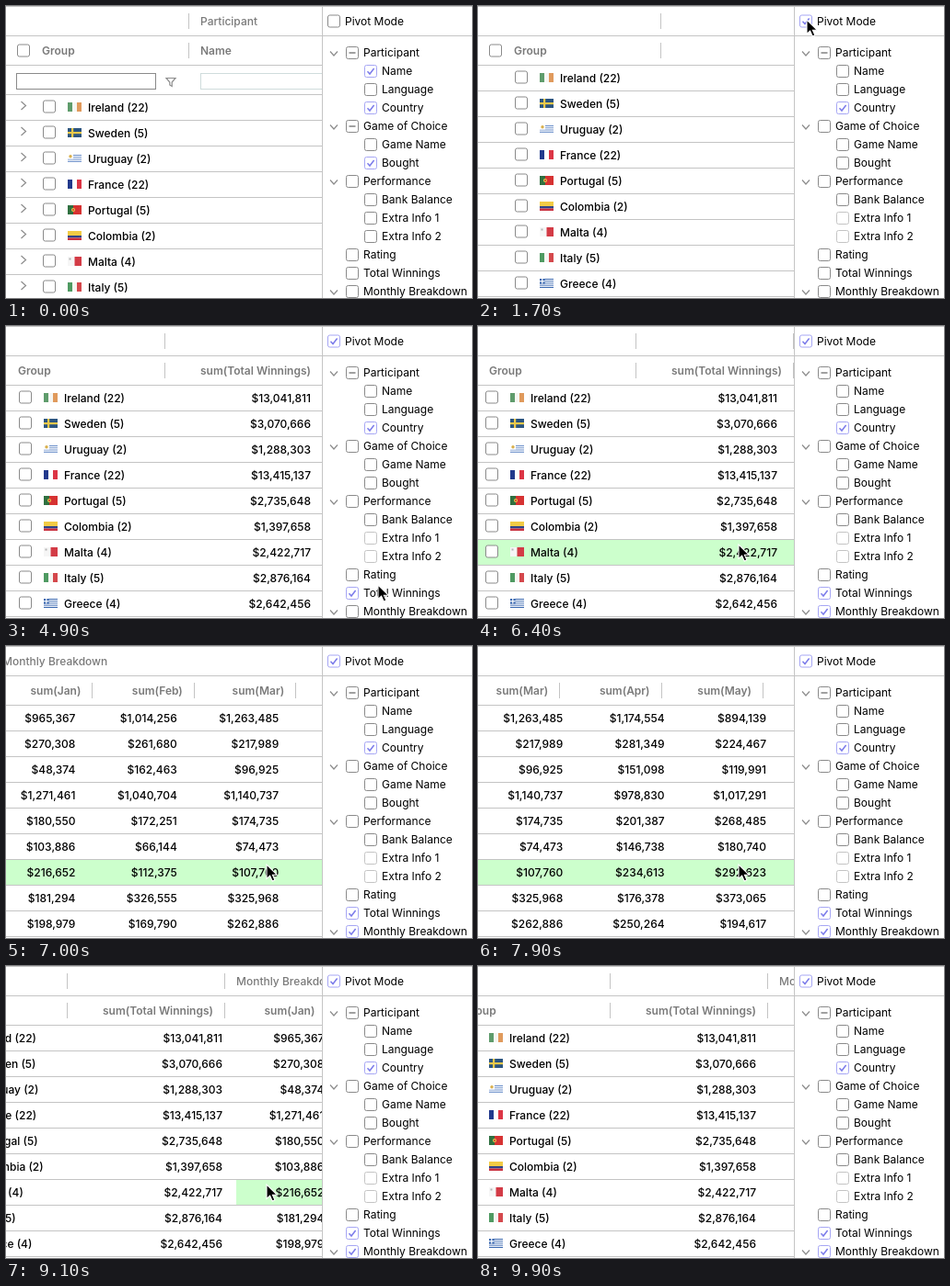
An HTML page for the animation above (10 s loop, 506 by 318 pixels).

```html
<!DOCTYPE html>
<html lang="en">
<head>
<meta charset="utf-8">
<title>Pivot grid</title>
<style>
  html, body { margin: 0; width: 100%; height: 100%; overflow: hidden; background: #fff; }
  svg { display: block; }
  text { font: 400 12px Inter, "Noto Sans", sans-serif; fill: #000; }
  .cell { font-weight: 500; }
  .head { font-weight: 600; fill: #7a7a7a; }
  .band { font-weight: 500; fill: #7a7a7a; }
  .end { text-anchor: end; }
  .rule { stroke: #c4c4c4; }
  .icon { fill: none; stroke: #8c8c8c; stroke-width: 1.2; }
  .box { fill: #fff; stroke: #8a8a8a; }
  .box.on { stroke: #a6a6f4; }
  .tick { fill: none; stroke: #7b7bea; stroke-width: 1.5; }
  .dash { stroke: #777; stroke-width: 1.4; }
</style>
</head>
<body>
<svg id="stage" width="506" height="318" viewBox="0 0 506 318">
  <clipPath id="view"><rect width="343" height="318"/></clipPath>
</svg>
<script>
const LOOP = 10000, STEP = 100, LAG = 35;
const CLICK = { pivot: 1500, total: 3300, months: 5400 };
const ROW = 28, TOP = 64, FILTER = 32;
const GROUP_END = 198, SUM_END = 369, MONTH_W = 110.4;

// [time, offset, slope]
const SCROLL = [
  [3550, 0, 0], [4000, 26, 0], [6350, 26, 0], [7000, 392, .085],
  [7550, 690, 0], [7900, 596, -.46], [8600, 260, -.19], [9500, 55, 0]
];

// [time, x, y]
const POINTER = [
  [500, 520, 90], [1400, 357, 15], [2000, 357, 15], [3200, 376, 288], [3400, 376, 288],
  [3650, 310, 262], [4150, 310, 262], [4900, 404, 282], [5250, 377, 308], [5500, 377, 308],
  [6250, 283, 238], [9250, 283, 238], [9650, 296, 330]
];

const MONTHS = ['Jan', 'Feb', 'Mar', 'Apr', 'May', 'Jun', 'Jul', 'Aug'];
const DATA = [
  ['Ireland (22)', 13041811, 965367, 1014256, 1263485, 1174554, 894139],
  ['Sweden (5)', 3070666, 270308, 261680, 217989, 281349, 224467],
  ['Uruguay (2)', 1288303, 48374, 162463, 96925, 151098, 119991],
  ['France (22)', 13415137, 1271461, 1040704, 1140737, 978830, 1017291],
  ['Portugal (5)', 2735648, 180550, 172251, 174735, 201387, 268485],
  ['Colombia (2)', 1397658, 103886, 66144, 74473, 146738, 180740],
  ['Malta (4)', 2422717, 216652, 112375, 107760, 234613, 292623],
  ['Italy (5)', 2876164, 181294, 326555, 325968, 176378, 373065],
  ['Greece (4)', 2642456, 198979, 169790, 262886, 250264, 194617]
];

// [label, depth, expandable, mark before, mark after, switch time]; marks: 0 none, 1 tick, 2 dash
const TREE = [
  ['Participant', 0, 1, 2, 2], ['Name', 1, 0, 1, 0], ['Language', 1, 0, 0, 0], ['Country', 1, 0, 1, 1],
  ['Game of Choice', 0, 1, 2, 0], ['Game Name', 1, 0, 0, 0], ['Bought', 1, 0, 1, 0],
  ['Performance', 0, 1, 0, 0], ['Bank Balance', 1, 0, 0, 0], ['Extra Info 1', 1, 0, 0, 0],
  ['Extra Info 2', 1, 0, 0, 0], ['Rating', 0, 0, 0, 0],
  ['Total Winnings', 0, 0, 0, 1, CLICK.total], ['Monthly Breakdown', 0, 1, 0, 1, CLICK.months]
];

const stage = document.getElementById('stage');

function add(parent, tag, attrs = {}, text) {
  const el = document.createElementNS('http://www.w3.org/2000/svg', tag);
  for (const key in attrs) el.setAttribute(key, attrs[key]);
  if (text) el.textContent = text;
  parent.append(el);
  return el;
}
const group = parent => add(parent, 'g');
const label = (parent, x, y, text, cls = '') => add(parent, 'text', { x, y, class: cls }, text);
const path = (parent, d, cls) => add(parent, 'path', { d, class: cls });
const rect = (parent, x, y, width, height, fill) => add(parent, 'rect', { x, y, width, height, fill });
const show = (el, on) => { el.style.display = on ? '' : 'none'; };
const move = (el, x, y) => el.setAttribute('transform', `translate(${x} ${y})`);
const money = n => '$' + n.toLocaleString('en-US');
const monthEnd = i => SUM_END + MONTH_W * (i + 1);

function checkbox(parent, cx, cy) {
  const g = group(parent);
  const box = add(g, 'rect', { x: cx - 6.5, y: cy - 6.5, width: 13, height: 13, rx: 2, class: 'box' });
  const tick = path(g, `M${cx - 3.5} ${cy + .3}l2.5 2.7l4.6 -6`, 'tick');
  const dash = path(g, `M${cx - 3.5} ${cy}h7`, 'dash');
  const set = mark => {
    box.classList.toggle('on', mark === 1);
    show(tick, mark === 1);
    show(dash, mark === 2);
  };
  set(0);
  return { g, set };
}

function bands(parent, colors, sizes, vertical) {
  const sum = sizes.reduce((a, b) => a + b);
  let at = 0;
  colors.forEach((color, i) => {
    const size = sizes[i] / sum * (vertical ? 15 : 10);
    if (vertical) rect(parent, at, 0, size, 10, color);
    else rect(parent, 0, at, 15, size, color);
    at += size;
  });
}
const thirds = (...colors) => g => bands(g, colors, [1, 1, 1], true);
const stripes = (a, b) => g =>
  bands(g, Array.from({ length: 9 }, (_, i) => i % 2 ? b : a), Array(9).fill(1));
const dot = (g, cx, cy, r, fill) => add(g, 'circle', { cx, cy, r, fill });

const FLAGS = [
  thirds('#5f9c6c', '#f6f6f2', '#e09a5c'),
  g => {
    rect(g, 0, 0, 15, 10, '#2c5580');
    rect(g, 4, 0, 2.2, 10, '#ecc94a');
    rect(g, 0, 4, 15, 2.2, '#ecc94a');
  },
  g => {
    stripes('#fff', '#5b83c4')(g);
    rect(g, 0, 0, 6, 5.5, '#fff');
    dot(g, 3, 2.8, 1.7, '#d9b04c');
  },
  thirds('#22398c', '#fff', '#dc3545'),
  g => {
    bands(g, ['#2f7040', '#d63232'], [2, 3], true);
    dot(g, 6, 5, 2, '#e8cf4a');
    dot(g, 6, 5, 1, '#d63232');
  },
  g => bands(g, ['#f2cb45', '#2f4488', '#c9313f'], [2, 1, 1]),
  g => {
    bands(g, ['#f6f6f6', '#d33b46'], [1, 1], true);
    rect(g, 1.5, 1.5, 2, 2, '#b4b4b4');
  },
  thirds('#4f9a62', '#f6f6f2', '#d4484c'),
  g => {
    stripes('#3a68b0', '#fff')(g);
    rect(g, 0, 0, 5.6, 5.6, '#3a68b0');
    rect(g, 2.2, 0, 1.2, 5.6, '#fff');
    rect(g, 0, 2.2, 5.6, 1.2, '#fff');
  }
];

function randomizer(seed) {
  return () => (seed = (seed * 16807) % 2147483647) / 2147483647;
}
const random = randomizer(77);

// Grid
rect(stage, 0, 0, 506, 318, '#fff');
const grid = add(stage, 'g', { 'clip-path': 'url(#view)' });
const hover = rect(grid, 0, 0, 343, ROW - 1, '#ccffcc');
const lines = group(grid);
DATA.forEach((_, i) => path(lines, `M0 ${TOP + ROW * (i + 1) + .5}H343`, 'rule'));

const body = group(grid), expanders = group(body), sums = group(body), cells = group(body);
DATA.forEach(([name, total, ...months], i) => {
  const y = TOP + ROW * i + 14;
  path(expanders, `M16.5 ${y - 6}l5 4.5l-5 4.5`, 'icon');
  checkbox(body, 47, y - .5);
  const flag = group(body);
  move(flag, 67, y - 5);
  FLAGS[i](flag);
  label(body, 89, y + 4.5, name, 'cell');
  label(sums, SUM_END - 12, y + 4.5, money(total), 'cell end');
  MONTHS.forEach((_, m) => {
    const value = months[m] || Math.round(total * (.05 + .06 * random()));
    label(cells, monthEnd(m) - 12, y + 4.5, money(value), 'cell end');
  });
});

const head = group(grid);
const divider = (parent, x, y) => path(parent, `M${x + .5} ${y}v17`, 'rule');
checkbox(head, 19, 48.5);
label(head, 39, 53, 'Group', 'head');
divider(head, GROUP_END, 8);
divider(head, GROUP_END, 40);

const plain = group(head);
label(plain, 211, 21, 'Participant', 'band');
label(plain, 211, 53, 'Name', 'head');
add(plain, 'rect', { x: 11.5, y: 73.5, width: 151, height: 17, class: 'box' });
add(plain, 'rect', { x: 211.5, y: 73.5, width: 151, height: 17, fill: '#fff', stroke: '#cfdcdc' });
path(plain, 'M174 78.5h10l-3.8 4.5v4.5l-2.4 -1.5v-3z', 'icon');

const sumHead = group(head);
label(sumHead, SUM_END - 12, 53, 'sum(Total Winnings)', 'head end');
divider(sumHead, SUM_END, 8);
divider(sumHead, SUM_END, 40);

const monthHead = group(head);
label(monthHead, SUM_END + 13, 21, 'Monthly Breakdown', 'band');
MONTHS.forEach((name, m) => {
  label(monthHead, monthEnd(m) - 12, 53, `sum(${name})`, 'head end');
  divider(monthHead, Math.round(monthEnd(m)), 40);
});

const filterLine = path(grid, `M0 ${TOP + FILTER + .5}H343`, 'rule');
path(grid, `M0 ${TOP + .5}H343`, 'rule');

// Side panel
path(stage, 'M0 .5H506M0 32.5H506M343.5 0V318', 'rule');
const pivotBox = checkbox(stage, 356, 16.5);
label(stage, 368, 21, 'Pivot Mode');
const boxes = TREE.map(([name, depth, open, before, after, at = CLICK.pivot], i) => {
  const y = 51 + 20 * i, x = 376 + 20 * depth;
  if (open) path(stage, `M352 ${y - 1.5}l4 4.5l4 -4.5`, 'icon');
  const { g, set } = checkbox(stage, x, y);
  label(stage, x + 12, y + 4, name);
  return { g, name, update: t => set(t >= at ? after : before) };
});

const pointer = add(stage, 'path', {
  d: 'M0 0V15.5L3.6 12.2L6.2 18L8.9 16.8L6.4 11.2H11.2Z',
  fill: '#000', stroke: '#fff', 'stroke-width': 1.1
});

// Motion
function span(keys, t) {
  const i = keys.findIndex(k => k[0] > t);
  if (i === 0) return [keys[0], keys[0], 0];
  if (i < 0) return [keys.at(-1), keys.at(-1), 0];
  const a = keys[i - 1], b = keys[i];
  return [a, b, (t - a[0]) / (b[0] - a[0])];
}

function scrollAt(t) {
  const [a, b, u] = span(SCROLL, t), h = b[0] - a[0], v = 1 - u;
  const s = a[1] * (1 + 2 * u) * v * v + a[2] * h * u * v * v
    + b[1] * u * u * (3 - 2 * u) - b[2] * h * u * u * v;
  return Math.round(s);
}

function pointerAt(t) {
  const [a, b, u] = span(POINTER, t), e = u * u * (3 - 2 * u);
  return [1, 2].map(k => Math.round(a[k] + (b[k] - a[k]) * e));
}

function render(t) {
  const pivot = t >= CLICK.pivot, total = t >= CLICK.total, months = t >= CLICK.months;
  const shift = pivot ? 0 : FILTER, left = scrollAt(t), [px, py] = pointerAt(t);

  move(body, -left, shift);
  move(lines, 0, shift);
  move(head, -scrollAt(t - LAG), 0);
  for (const el of [expanders, plain, filterLine]) show(el, !pivot);
  for (const el of [sums, sumHead]) show(el, total);
  for (const el of [cells, monthHead]) show(el, months);

  pivotBox.set(pivot ? 1 : 0);
  for (const box of boxes) {
    box.update(t);
    if (box.name.startsWith('Extra')) box.g.style.opacity = pivot ? .5 : 1;
  }

  // Columns drawn again on the way back stay unlit.
  const row = Math.floor((py - TOP - shift) / ROW);
  const start = t > 7600 ? Math.max(0, SUM_END + 3 - left) : 0;
  show(hover, px < 343 && row >= 0 && py < 318 && start < 343);
  hover.setAttribute('x', start);
  hover.setAttribute('y', TOP + shift + ROW * row + 1);

  move(pointer, px, py);
}

const began = performance.now();
function frame() {
  const t = (performance.now() - began) % LOOP;
  render(Math.floor(t / STEP) * STEP);
  requestAnimationFrame(frame);
}
render(0);
requestAnimationFrame(frame);
</script>
</body>
</html>
```
